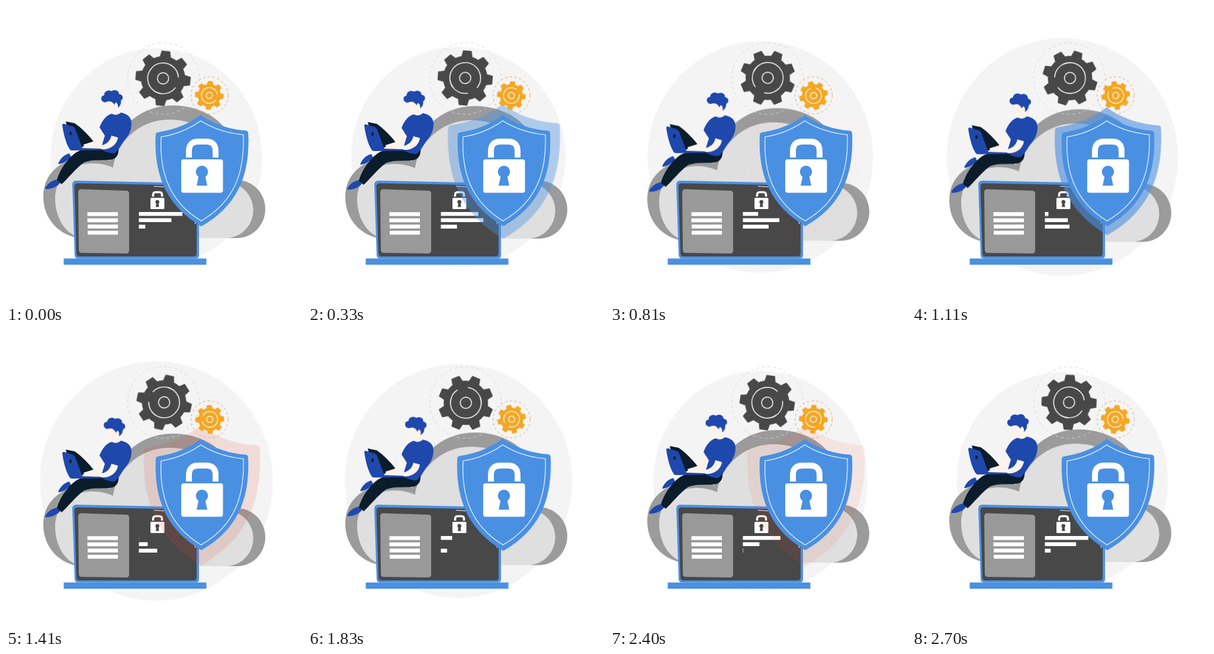
These frames come from a looping animation (500 px wide and 500 px high, 2730 ms). An HTML page:

```html
<!DOCTYPE html>
<html lang="en">
<head>
<meta charset="utf-8">
<title>Cloud security</title>
<style>
  html, body { margin: 0; width: 100%; height: 100%; overflow: hidden; background: #fff; }
  svg { display: block; width: 100vw; height: 100vh; }

  .sway { animation: 1365ms cubic-bezier(.364, 0, .636, 1) infinite alternate; }
  .halo { animation-name: grow; transform-origin: 254px 255px; }
  .float { animation-name: sink; }
  .head { animation-name: nod; transform-origin: 186px 182px; }
  .bar { animation-name: shrink; transform-origin: 224.5px 0; }
  .bar:nth-of-type(2) { animation-delay: -2275ms; }
  .bar:nth-of-type(3) { animation-delay: -1820ms; }
  .spin { animation: spin 2730ms linear infinite; }
  .back { animation-direction: reverse; }
  .pulse {
    transform-origin: 331px 271px;
    animation:
      swell 910ms cubic-bezier(.333, 1, .667, 1) infinite,
      fade 910ms cubic-bezier(.333, .667, .667, 1) infinite,
      blush 910ms linear infinite;
  }

  @keyframes grow { to { transform: scale(1.102); } }
  @keyframes sink { to { transform: translateY(7px); } }
  @keyframes nod { to { transform: rotate(9deg); } }
  @keyframes shrink { to { transform: scaleX(0); } }
  @keyframes spin { to { transform: rotate(360deg); } }
  @keyframes swell { to { transform: scale(1.282); } }
  @keyframes fade { from { opacity: 1; } to { opacity: 0; } }
  @keyframes blush {
    0%, 42% { fill: #4a90e2; fill-opacity: 1; }
    53%, 100% { fill: #e8503f; fill-opacity: .72; }
  }

  .blue { fill: #4a90e2; }
  .dark { fill: #484848; }
  .white { fill: #fff; }
  .line { fill: none; stroke: #fff; }
  .shirt { fill: #1f48ad; }
  .navy { fill: #0b1c2b; }
  .skin { fill: #fdf3eb; }
</style>
</head>
<body>
<svg viewBox="0 0 500 500">
  <defs>
    <path id="shield" d="M329 184C352 201 380 209 404.500 210.500Q409 211 409 215C412 280 395 335 330 372C267 335 250 280 253 217.500Q253 214 257 213.500C285 209 308 200 329 184Z"/>
  </defs>

  <ellipse class="sway halo" cx="254" cy="255" rx="178.500" ry="183.500" fill="#f4f4f4"/>

  <g class="sway float">
    <path fill="#9b9b9b" d="M125 392C90 388 63 360 63 322C63 287 86 266 116 258C140 252 160 256 176 261C182 212 222 168 282 168C338 168 376 200 388 240L390 294A48 49 0 0 1 390 392Z"/>
    <path fill="#dfdfdf" d="M130 392C100 388 83 357 83 325C83 294 106 268 140 266C158 265 171 269 181 273C186 233 222 192 276 192C335 192 374 230 378 298A47.500 47.500 0 0 1 376 392Z"/>

    <!-- seated figure -->
    <path class="shirt" d="M88 267C91 258 98 251 107 249L110 255C104 262 96 267 88 267Z"/>
    <path class="navy" d="M101 195L116 198C128 206 140 219 148 229L134 238L112 240Z"/>
    <path class="shirt" d="M66 309C68 301 77 295 86 293L92 298C87 305 77 310 66 309Z"/>
    <path class="navy" d="M190 239L128 243C112 247 92 272 86 294L94 301C106 290 116 276 132 264C148 258 168 262 180 259C188 256 191 249 190 239Z"/>
    <path class="skin" d="M160 207L147 229L131 234L132 239L152 237L168 213Z"/>
    <g class="sway head">
      <path class="skin" d="M169 160L172 176Q175 180 180 179L179 186L194 185L191 166L194 158L180 154Z"/>
      <path class="shirt" d="M163 161C159 157 161 151 166 151C165 144 174 141 178 144C184 140 191 143 191 149C198 149 199 157 194 160C195 166 192 170 189 172C190 166 187 163 185 163L183 167C180 161 174 160 170 162Q166 164 163 161Z"/>
    </g>
    <path class="shirt" d="M179 182C184 185 190 184 194 180C205 182 212 188 212 198C212 212 206 220 199 228C194 235 190 244 183 249C175 249 166 246 160 242L167 219L158 205C162 194 169 184 179 182Z"/>
    <path class="skin" d="M178 219L189 222C188 232 179 241 167 242L135 242L127 239L133 236L159 236C170 234 176 228 178 219Z"/>
    <path class="shirt" d="M95 201Q95 198.500 98 199L113 203.500Q116 204.500 117 208L129 240L161 241L160 243.500L112 244Q108 244 107 241C101 232 97 215 95 201Z"/>
    <ellipse class="navy" cx="109" cy="215" rx="2" ry="3"/>
  </g>

  <!-- laptop -->
  <path class="blue" d="M119 295L262 298L318 300Q326 301 326 308V421Q326 426.500 320 426.500H122Q116.500 426.500 116 421L112 302Q112 295 119 295Z"/>
  <path class="dark" d="M121 299.500L262 302L317 304Q322 304 322 309V418Q322 423 317 423H124Q119 423 119 418L115.500 305Q115.500 299.500 121 299.500Z"/>
  <path fill="#999" d="M127 309.500L203 312Q208 312 208 317V413Q208 418 203 418L128 417Q123 417 123 412L122 315Q122 309.500 127 309.500Z"/>
  <rect class="blue" x="97.500" y="426.500" width="241" height="10.500"/>
  <path class="line" d="M137.500 351.500H189M137.500 362H189M138 372.500H189M138 383H189" stroke-width="6.500"/>
  <path class="line" d="M250 304.500L267 305.500M319.500 364V368" stroke-width="1.200"/>
  <g class="white">
    <rect class="sway bar" x="224.500" y="348" width="73.500" height="6.500"/>
    <rect class="sway bar" x="224.500" y="358.500" width="73.500" height="6.500"/>
    <rect class="sway bar" x="224.500" y="369.500" width="44" height="6.500"/>
  </g>
  <path class="line" d="M248.500 322V319Q248.500 314.500 253 314.500H259Q263.500 314.500 263.500 319V322" stroke-width="3.500"/>
  <rect class="white" x="244" y="324" width="23.500" height="19" rx="1.500"/>
  <path class="dark" d="M254 332L253 339.500H258.500L257.500 332Z"/>
  <circle class="dark" cx="255.700" cy="331" r="3.300"/>

  <use href="#shield" class="pulse"/>

  <!-- gears -->
  <g fill="none">
    <circle cx="266" cy="122.500" r="60.500" stroke="#d4d4d4" stroke-dasharray="4.500 5"/>
    <circle cx="344" cy="151" r="31.300" stroke="#e3a068" stroke-dasharray="4 4"/>
  </g>
  <g transform="translate(266.200 122.200)"><g class="spin" id="big"></g></g>
  <g transform="translate(343.800 151)"><g class="spin back" id="small"></g></g>

  <!-- shield -->
  <use href="#shield" class="blue"/>
  <path class="line" stroke-width="1.100" d="M329 194C351 208 376 215 401 217.500C403 280 387 330 329.500 363C275 330 259 280 262 221C288 217 309 208 329 194Z"/>
  <path class="line" stroke-width="10" d="M309 256V245Q309 229 325 229H338Q354 229 354 245V256"/>
  <rect class="white" x="296" y="259" width="70.500" height="56.500" rx="4"/>
  <path class="blue" d="M326 285L322 303.500H340L336 285Z"/>
  <circle class="blue" cx="331" cy="280" r="10.300"/>
</svg>
<script>
  const TEETH = 8;

  const point = (r, deg) => {
    const a = deg * Math.PI / 180;
    return `${(r * Math.cos(a)).toFixed(2)} ${(r * Math.sin(a)).toFixed(2)}`;
  };

  function gearPath(outer, root) {
    const step = 360 / TEETH;
    let d = '';
    for (let i = 0; i < TEETH; i++) {
      const a = i * step;
      d += `${i ? 'L' : 'M'}${point(root, a - 14)}L${point(outer, a - 8.5)}` +
           `L${point(outer, a + 8.5)}L${point(root, a + 14)}` +
           `A${root} ${root} 0 0 1 ${point(root, a + step - 14)}`;
    }
    return d + 'Z';
  }

  function drawGear(id, { outer, root, arc, hub, color, offset, tilt, width }) {
    document.getElementById(id).innerHTML =
      `<g transform="translate(${offset} 0) rotate(${tilt})">
        <path d="${gearPath(outer, root)}" fill="${color}" stroke="${color}" stroke-linejoin="round"/>
        <g class="line" stroke-width="${width}">
          <circle r="${arc}" pathLength="360" stroke-dasharray="320 40" transform="rotate(30)"/>
          <circle r="${hub}"/>
        </g>
      </g>`;
  }

  drawGear('big', { outer: 46.5, root: 37, arc: 26, hub: 9.5, color: '#484848', offset: -0.9, tilt: 6, width: 1.5 });
  drawGear('small', { outer: 24, root: 19, arc: 13.3, hub: 5.3, color: '#f5a623', offset: -0.4, tilt: 4, width: 1.3 });
</script>
</body>
</html>
```
